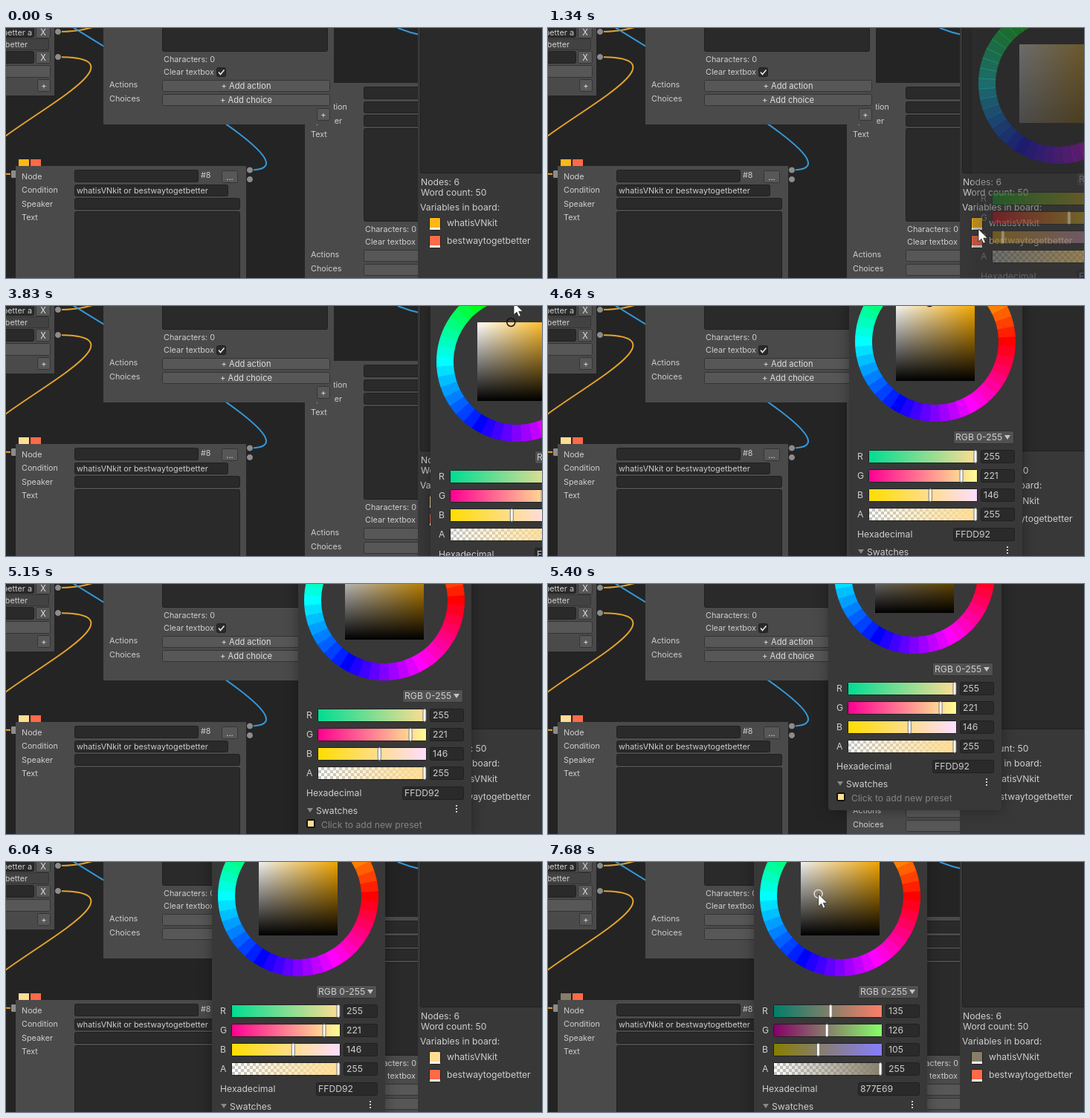
Write an HTML page with a canvas that moves like this. It is 721 px wide and 337 px high and loops after 8 s.

```html
<!DOCTYPE html>
<html>
<head>
<meta charset="utf-8">
<title>Colour picker in a node editor</title>
<style>
  html, body { margin: 0; width: 100%; height: 100%; overflow: hidden; background: #242424; }
  canvas { display: block; }
</style>
</head>
<body>
<canvas id="stage" width="721" height="337"></canvas>
<script>
const ctx = document.getElementById('stage').getContext('2d');
const LOOP = 8000, HUE = 41.3, RED = '#ff6a48', TEXT = '#cecece';
const OPEN = 1310, DRAG_START = 2740, DRAG_END = 2960, PICK = 7650;

// Keyframes: time, x, y
const cursorTrack = [
  [830, 570, 340], [930, 581, 273], [1080, 581, 273], [1160, 579, 271],
  [1830, 579, 271], [2000, 628, 180], [2170, 680, 91], [2300, 691, 62], [2460, 686, 52],
  [2740, 686, 52], [2960, 679.3, -3], [3820, 679.3, -3], [3830, 683, -5], [3849, 683, -5],
  [3850, 683, -40], [6580, 521, -40], [6600, 525, -4], [6680, 723, 180],
  [6830, 723, 212], [7100, 560, 70], [7300, 420, 4], [7590, 363.6, 42.9]
];
const windowTrack = [
  [4440, 571, 230], [4640, 405, 203], [4850, 402, 186], [5130, 402, 186], [5150, 393, 177],
  [5540, 368, 121], [5770, 368, 121], [5840, 345, 141], [6040, 277, 201]
];

function at(track, t) {
  const i = track.findIndex(k => k[0] > t);
  if (i === 0) return track[0].slice(1);
  if (i < 0) return track[track.length - 1].slice(1);
  const [t0, x0, y0] = track[i - 1], [t1, x1, y1] = track[i];
  const f = (t - t0) / (t1 - t0);
  return [x0 + (x1 - x0) * f, y0 + (y1 - y0) * f];
}

const clamp = v => Math.min(1, Math.max(0, v));
const rgb = c => `rgb(${c.join()})`;

function rect(x, y, w, h, fill) {
  ctx.fillStyle = fill;
  ctx.fillRect(x, y, w, h);
}

function box(x, y, w, h, fill = '#2a2a2a', border = '#202020') {
  ctx.beginPath();
  ctx.roundRect(x + .5, y + .5, w - 1, h - 1, 2);
  ctx.fillStyle = fill;
  ctx.fill();
  ctx.strokeStyle = border;
  ctx.lineWidth = 1;
  ctx.stroke();
}

function label(str, x, y, size = 12.2, color = TEXT, align = 'left') {
  ctx.font = `${size}px Inter, sans-serif`;
  ctx.textAlign = align;
  ctx.fillStyle = color;
  ctx.fillText(str, x, y);
}

function button(x, y, w, h, str) {
  box(x, y, w, h, '#575757', '#343434');
  label(str, x + w / 2, y + h / 2 + 4, 11.1, '#e0e0e0', 'center');
}

function path(d, color, width) {
  ctx.strokeStyle = color;
  ctx.lineWidth = width;
  ctx.stroke(new Path2D(d));
}

// Leaves an output to the right and enters an input from the left
function wire(x0, y0, x1, y1, reach, color) {
  path(`M${x0} ${y0}C${x0 + reach} ${y0} ${x1 - reach} ${y1} ${x1} ${y1}`, color, 2);
}

function dot(x, y) {
  ctx.beginPath();
  ctx.arc(x, y, 4.5, 0, 7);
  ctx.fillStyle = '#8c8c8c';
  ctx.fill();
  ctx.strokeStyle = '#1a1a1a';
  ctx.lineWidth = 1;
  ctx.stroke();
}

function triangle(x, y, color) {
  ctx.fillStyle = color;
  ctx.fill(new Path2D(`M${x - 4} ${y - 3}h8l-4 6z`));
}

function node(x, y, id, condition) {
  const small = (str, dx, dy) => label(str, dx, dy, 10.8);
  ctx.save();
  ctx.translate(x, y);
  rect(0, 0, 310, 285, '#4a4a4a');
  ['Node', 'Condition', 'Speaker', 'Text'].forEach((s, i) => small(s, 8, 18 + i * 18.4));
  box(79, 5, 167, 17);
  small(id, 249, 16);
  button(277, 6, 22, 17, '...');
  box(79, 25, 207, 16);
  small(condition, 82, 37);
  box(79, 43, 223, 16);
  box(79, 61, 223, 126);
  small('Characters: 0', 81, 201);
  small('Clear textbox', 81, 218);
  box(152, 208, 13, 13);
  path('M155 214.5l2.5 3l5 -6', '#e8e8e8', 1.6);
  small('Actions', 8, 234.5);
  button(79, 225, 226, 16, '+ Add action');
  small('Choices', 8, 253.5);
  button(79, 244, 226, 16, '+ Add choice');
  button(287, 263, 18, 17, '+');
  ctx.restore();
}

function choiceNode() {
  rect(0, 0, 65, 91, '#4a4a4a');
  box(-5, -5, 43, 18);
  label('better a', 35, 10, 10.8, TEXT, 'right');
  button(40, -3, 20, 17, 'X');
  box(-5, 14, 63, 16, '#424242', '#333');
  label('better', 29, 26, 10.8, TEXT, 'right');
  box(-5, 31, 43, 17);
  button(40, 31, 20, 17, 'X');
  box(-5, 50, 65, 17, '#575757', '#343434');
  button(42, 69, 18, 17, '+');
  dot(70, 5);
  dot(70, 39);
}

function swatch(x, y, color) {
  box(x, y, 16, 18, color);
  rect(x + 1, y + 14, 14, 3, '#fff');
}

function board(color) {
  const orange = '#e3a32f', blue = '#3598d8';
  rect(0, 0, 721, 337, '#242424');
  path('M70 5C95 5 110 2 125 -4', orange, 2);
  wire(70, 39, 9, 197, 175, orange);
  wire(328, 191.5, -42, -128, 150, blue);
  path('M527 0C537 4 546 7 560 10', blue, 2);
  choiceNode();
  node(402, 74, '', '');
  node(131, -155, '', '');
  box(6, 191, 10, 12, '#8c8c8c');
  node(13, 186, '#8', 'whatisVNkit or bestwaytogetbetter');
  rect(17, 177, 14, 9, color);
  rect(33, 177, 14, 9, RED);
  dot(328, 191.5);
  dot(328, 204);

  rect(554, 0, 167, 337, '#383838');
  box(557, -5, 180, 201);
  label('Nodes: 6', 558, 212);
  label('Word count: 50', 558, 226);
  label('Variables in board:', 557, 246);
  swatch(569, 255, color);
  label('whatisVNkit', 593, 267);
  swatch(569, 279, RED);
  label('bestwaytogetbetter', 593, 291);
}

function gradient(x0, y0, x1, y1, from, to) {
  const g = ctx.createLinearGradient(x0, y0, x1, y1);
  g.addColorStop(0, from);
  g.addColorStop(1, to);
  return g;
}

function slider(name, y, value, from, to) {
  label(name, 11, y + 4);
  box(26, y - 9, 147, 18);
  if (name === 'A') {
    for (let i = 0; i < 144; i++)
      rect(27 + (i >> 2) * 4, y - 8 + (i & 3) * 4, 4, 4, (i + (i >> 2)) % 2 ? '#c4c4c4' : '#fff');
  }
  rect(27, y - 8, 145, 16, gradient(27, 0, 172, 0, from, to));
  const x = 28 + value / 255 * 142;
  box(x - 2.5, y - 9, 5, 18, '#fff', '#777');
  box(177, y - 9, 46, 18);
  label(value, 181, y + 4);
}

// Local origin: left edge of the window, centre of the R slider
function picker(x, y, s, v, color) {
  ctx.save();
  ctx.translate(x, y);
  ctx.shadowColor = 'rgba(0,0,0,.35)';
  ctx.shadowBlur = 18;
  ctx.fillStyle = '#383838';
  ctx.beginPath();
  ctx.roundRect(0, -420, 233, 584, 4);
  ctx.fill();
  ctx.shadowColor = 'transparent';

  const step = Math.PI / 24;
  ctx.lineWidth = 23;
  for (let i = 0; i < 48; i++) {
    ctx.beginPath();
    ctx.arc(116, -155, 96.5, -(i + .53) * step, -(i - .53) * step);
    ctx.strokeStyle = `hsl(${i * 7.5} 100% 50%)`;
    ctx.stroke();
  }
  rect(63, -208, 106, 106, gradient(63, 0, 169, 0, '#fff', `hsl(${HUE} 100% 50%)`));
  rect(63, -208, 106, 106, gradient(0, -208, 0, -102, 'rgba(0,0,0,0)', '#000'));
  ctx.beginPath();
  ctx.arc(63 + s * 106, -208 + (1 - v) * 106, 5.5, 0, 7);
  ctx.strokeStyle = v > .6 ? '#111' : '#ddd';
  ctx.lineWidth = 1.5;
  ctx.stroke();

  box(140, -35, 82, 18, '#515151', '#303030');
  label('RGB 0-255', 143, -22);
  triangle(213, -26, '#c4c4c4');

  ['R', 'G', 'B'].forEach((name, i) => {
    const end = value => rgb(color.map((c, j) => j === i ? value : c));
    slider(name, i * 26, color[i], end(0), end(255));
  });
  slider('A', 78, 255, `rgba(${color},0)`, rgb(color));

  label('Hexadecimal', 11, 109);
  box(140, 96, 83, 18);
  label(color.map(c => c.toString(16).padStart(2, '0')).join('').toUpperCase(), 143, 109);
  triangle(16, 128, '#888');
  label('Swatches', 24, 133);
  for (let i = 0; i < 3; i++) rect(212, 121 + i * 4, 2, 2, '#d0d0d0');
  box(11, 140, 12, 12, '#111', '#111');
  rect(13, 142, 8, 8, rgb(color));
  label('Click to add new preset', 31, 152, 12.2, '#848484');
  ctx.restore();
}

function cursor(x, y) {
  const arrow = new Path2D(`M${x} ${y}v17l4 -3.7l2.6 6l2.8 -1.2l-2.6 -5.8h5.4z`);
  ctx.fillStyle = '#fff';
  ctx.fill(arrow);
  ctx.strokeStyle = '#222';
  ctx.lineWidth = .8;
  ctx.stroke(arrow);
}

function saturationAndValue(t) {
  if (t < DRAG_START) return [.91, 1];
  const picked = t < PICK ? Math.min(t, DRAG_END) : t;
  const [cx, cy] = at(cursorTrack, picked), [wx, wy] = at(windowTrack, picked);
  return [clamp((cx - wx - 63) / 106), clamp(1 - (cy - wy + 208) / 106)];
}

function draw(now) {
  const t = now % LOOP;
  const [s, v] = saturationAndValue(t);
  const color = [1, 1 - s * (1 - HUE / 60), 1 - s].map(c => Math.round(c * v * 255));
  board(rgb(color));
  if (t >= OPEN) {
    ctx.globalAlpha = clamp((t - OPEN + 30) / 200);
    picker(...at(windowTrack, t).map(Math.round), s, v, color);
    ctx.globalAlpha = 1;
  }
  cursor(...at(cursorTrack, t));
  requestAnimationFrame(draw);
}
requestAnimationFrame(draw);
</script>
</body>
</html>
```
